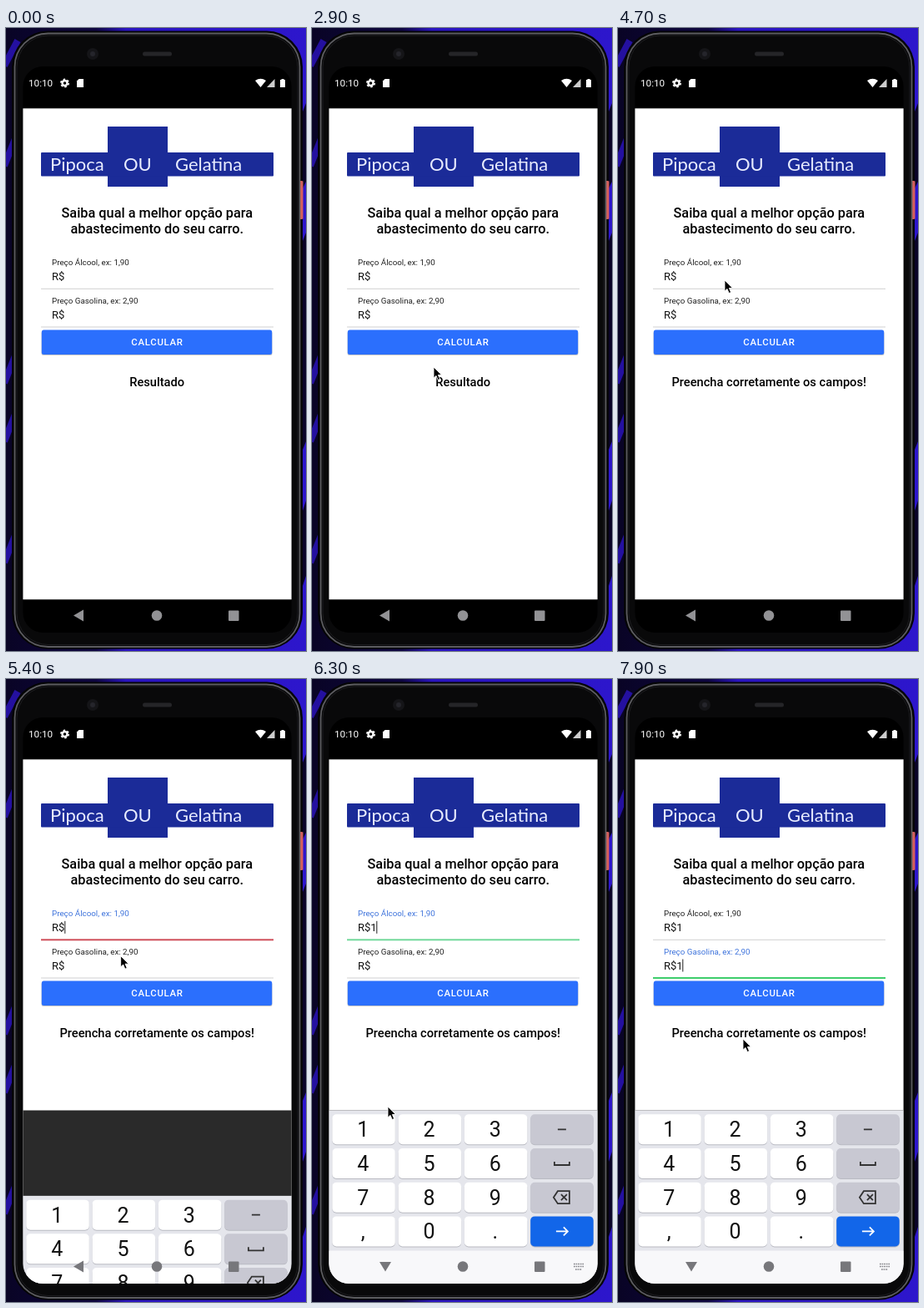
An HTML page for the animation above (8000 ms loop, 360x746 px).

```html
<!DOCTYPE html>
<html lang="pt">
<head>
<meta charset="utf-8">
<title>Calculadora de combustível</title>
<style>
  html, body { margin: 0; width: 100%; height: 100%; overflow: hidden; background: #0b0530; }
  svg { display: block; width: 100%; height: 100%; }
  text { font-family: Roboto, sans-serif; fill: #111; }
  .mid { text-anchor: middle; }
  .bold { font-weight: 500; fill: #000; }
  .label { font-size: 9.8px; }
  .value { font-size: 13px; }
  .brand text { font: 22px Lato, sans-serif; fill: #e8ecff; }
  .key text { font-size: 25px; text-anchor: middle; }
</style>
</head>
<body>
<svg viewBox="0 0 360 746" preserveAspectRatio="none">
  <defs>
    <linearGradient id="wall">
      <stop offset="0" stop-color="#090425"/>
      <stop offset=".3" stop-color="#0e0640"/>
      <stop offset=".4" stop-color="#2a14c0"/>
      <stop offset="1" stop-color="#2d16cc"/>
    </linearGradient>
    <clipPath id="screen"><rect x="20.4" y="46" width="322.200" height="678" rx="24"/></clipPath>
  </defs>

  <!-- wallpaper and phone body -->
  <rect width="360" height="746" fill="url(#wall)"/>
  <path d="M-2 45L14 15M-2 165L14 125M-2 425L14 385M-2 495L14 455M-2 640L14 600" stroke="#2410a0" stroke-width="8"/>
  <path d="M352 110L362 85V180L352 200ZM352 265L362 240V490L352 515ZM352 590L362 560V650L352 680Z" fill="#0a0428"/>
  <rect x="352" y="183" width="4.500" height="46" rx="1" fill="#d8605c"/>
  <rect x="7" y="3.500" width="349" height="740" rx="43" fill="#050506"/>
  <rect x="352" y="183" width="4" height="46" rx="1" fill="#d8605c"/>
  <rect x="10.500" y="6.500" width="342" height="734.500" rx="40" fill="#09090a" stroke="#5c5c60" stroke-width="1.8"/>
  <rect x="13" y="9" width="337" height="729.500" rx="38" fill="#09090a" stroke="#1d1d20"/>
  <circle cx="104" cy="31" r="7" fill="#151518"/>
  <circle cx="104" cy="31" r="3" fill="#25252b"/>
  <rect x="164" y="28.500" width="35" height="5" rx="2.500" fill="#252528"/>

  <g clip-path="url(#screen)">
    <rect x="20" y="46" width="323" height="678"/>

    <!-- status bar -->
    <g fill="#fff">
      <text x="27" y="70" font-size="11.7" style="fill:#fff">10:10</text>
      <circle cx="70.500" cy="66" r="3" fill="none" stroke="#fff" stroke-width="2.4"/>
      <circle cx="70.500" cy="66" r="4.700" fill="none" stroke="#fff" stroke-width="1.6" stroke-dasharray="2.46"/>
      <path d="M87.500 61H93V71H85V63.500Z"/>
      <path d="M299 63Q305.500 58.500 312 63L305.500 71Z"/>
      <path d="M322.500 61V71H313Z" opacity=".8"/>
      <path d="M329 62H330.500V61H333.500V62H335V71H329Z"/>
    </g>

    <!-- page -->
    <rect x="20" y="96.300" width="323" height="588" fill="#fff"/>
    <g class="brand">
      <rect x="122" y="118" width="72" height="72" fill="#1b2b98"/>
      <rect x="42" y="149" width="279" height="28.500" rx="1" fill="#1b2b98"/>
      <text x="53" y="171">Pipoca</text>
      <text x="141" y="171">OU</text>
      <text x="203" y="171">Gelatina</text>
    </g>
    <g class="mid bold" font-size="16.3">
      <text class="bold" x="181.300" y="226.500">Saiba qual a melhor opção para</text>
      <text class="bold" x="181.300" y="246">abastecimento do seu carro.</text>
    </g>
    <g id="fields"></g>
    <rect x="42.500" y="363" width="277" height="29" rx="2.500" fill="#000" opacity=".22"/>
    <rect x="42.800" y="361.500" width="276.400" height="29.500" rx="2.500" fill="#2b6ffd"/>
    <text class="mid bold" x="181.500" y="380.300" font-size="11.4" letter-spacing=".7" style="fill:#fff">CALCULAR</text>
    <text id="result" class="mid bold" x="181.200" y="429" font-size="14.65"></text>

    <!-- keyboard -->
    <rect id="shade" x="20" y="516.500" width="323" height="208" fill="#2a2a2a"/>
    <g id="board">
      <rect x="20" y="516.500" width="323" height="208" fill="#e5e6ec"/>
      <rect x="20" y="684.500" width="323" height="40" fill="#f8f8fa"/>
    </g>

    <!-- navigation bar -->
    <g id="nav">
      <path id="back"/>
      <circle cx="181" cy="703.500" r="6.300"/>
      <rect x="267" y="697.500" width="12.500" height="12.500" rx="1"/>
      <path id="dots" d="M314 700.500H326M314 703.500H326M316 707H324" stroke="#85858a" stroke-width="1.7" stroke-dasharray="1.7 .9"/>
    </g>
  </g>

  <path id="cursor" d="M0 0V13.200L3 10.400L5.200 15.500L7.600 14.500L5.400 9.500H9.600Z" fill="#000" stroke="#fff" stroke-width=".9"/>
</svg>

<script>
const $ = id => document.getElementById(id);
const LOOP = 8000, STEP = 100;

function add(parent, tag, attrs, text = '') {
  const el = document.createElementNS('http://www.w3.org/2000/svg', tag);
  for (const name in attrs) el.setAttribute(name, attrs[name]);
  el.textContent = text;
  return parent.appendChild(el);
}

// Each field is focused from `on` to `off`; the digit arrives at `typed`.
function makeField(y, caption, on, off, typed) {
  const box = $('fields');
  return {
    on, off, typed,
    label: add(box, 'text', { class: 'label', x: 55, y: y - 28 }, caption),
    value: add(box, 'text', { class: 'value', x: 55, y: y - 10.3 }),
    line: add(box, 'rect', { x: 42, width: 279 }),
    caret: add(box, 'rect', { y: y - 22.5, width: 1, height: 15, fill: '#222' }),
    y
  };
}
const fields = [
  makeField(312.3, 'Preço Álcool, ex: 1,90', 5200, 6900, 6200),
  makeField(358, 'Preço Gasolina, ex: 2,90', 6900, LOOP, 7700)
];

function drawField(f, t) {
  const focused = t >= f.on && t < f.off, filled = t >= f.typed;
  f.label.style.fill = focused ? '#3f74dc' : '#222';
  f.value.textContent = filled ? 'R$1' : 'R$';
  const fresh = t - f.typed < 200;
  const tint = !focused ? '#d2d2d2' : !filled ? '#cf4f5b' : fresh ? '#72d99b' : '#3fce6c';
  const weight = focused ? 2 : 1;
  f.line.setAttribute('fill', tint);
  f.line.setAttribute('height', weight);
  f.line.setAttribute('y', f.y - weight / 2);
  f.caret.setAttribute('x', filled ? 77.3 : 70.3);
  f.caret.setAttribute('visibility', focused ? 'visible' : 'hidden');
}

let oneKey;
['123-', '456_', '789<', ',0.>'].forEach((row, r) => [...row].forEach((char, c) => {
  const x = 24.3 + c * 79.3, y = 521.3 + r * 40.7, mx = x + 37.7, my = y + 18;
  const key = add($('board'), 'g', { class: 'key' });
  const fill = char === '>' ? '#1266e9' : c === 3 ? '#c8c8d2' : '#fff';
  add(key, 'rect', { x, y: y + 1, width: 75.5, height: 36, rx: 5, fill: '#b9bac2' });
  const face = add(key, 'rect', { x, y, width: 75.5, height: 36, rx: 5, fill });
  if (char === '1') oneKey = face;
  const icon = {
    '-': 'm-5 0h10',
    '_': 'm-9 -2v4h18v-4',
    '<': 'm-10 0l5 -7.500h14v15h-14zm9 -3.500l7 7m0 -7l-7 7',
    '>': 'm-7 0h14m-5 -5l5 5l-5 5'
  }[char];
  if (icon) add(key, 'path', {
    d: `M${mx} ${my}${icon}`, fill: 'none', stroke: char === '>' ? '#fff' : '#333', 'stroke-width': 1.8
  });
  else add(key, 'text', { x: mx - .8, y: my + 9 }, char);
}));

// Pointer stops: time, x, y
const path = [
  [800, 346, 284], [1000, 270, 296], [1300, 196, 318], [1600, 153, 374], [1700, 153, 374],
  [1900, 172, 398], [2100, 172, 398], [2300, 184, 402], [2500, 184, 402], [2900, 146, 406],
  [3300, 130, 407], [3600, 177, 402], [3900, 165, 374], [4200, 165, 374], [4700, 128, 302],
  [5200, 128, 302], [5500, 141, 342], [5900, 60, 540], [6100, 60, 540], [6300, 91, 512],
  [6700, 136, 340], [6900, 136, 340], [7400, 58, 548], [7700, 58, 544], [7900, 150, 431]
];

function pointer(t) {
  const i = path.findIndex(p => p[0] > t);
  if (i < 0) return path[path.length - 1].slice(1);
  const [t0, x0, y0] = path[i - 1], [t1, x1, y1] = path[i];
  const p = (t - t0) / (t1 - t0), e = p * p * (3 - 2 * p);
  return [x0 + (x1 - x0) * e, y0 + (y1 - y0) * e];
}

function draw(t) {
  fields.forEach(f => drawField(f, t));
  $('result').textContent = t < 4200 ? 'Resultado' : 'Preencha corretamente os campos!';

  const slide = Math.min(1, Math.max(0, (t - 5300) / 335));
  const open = slide === 1, shown = slide > 0 ? 'visible' : 'hidden';
  $('shade').setAttribute('visibility', shown);
  $('board').setAttribute('visibility', shown);
  $('board').setAttribute('transform', `translate(0 ${208 * (1 - slide) ** 2})`);
  const pressed = t === 6100 || t === 7600;
  oneKey.setAttribute('fill', pressed ? '#dcdce3' : '#fff');

  $('nav').setAttribute('fill', slide > 0 ? '#77777b' : '#929295');
  $('back').setAttribute('d', open ? 'M81 698H95L88 709.500Z' : 'M93 696.500V710.500L81 703.500Z');
  $('dots').setAttribute('visibility', open ? 'visible' : 'hidden');

  const present = t >= path[0][0];
  $('cursor').setAttribute('visibility', present ? 'visible' : 'hidden');
  if (present) $('cursor').setAttribute('transform', `translate(${pointer(t)})`);
}

const start = performance.now();
function frame() {
  const t = (performance.now() - start) % LOOP;
  draw(Math.floor(t / STEP) * STEP);
  requestAnimationFrame(frame);
}
frame();
</script>
</body>
</html>
```
